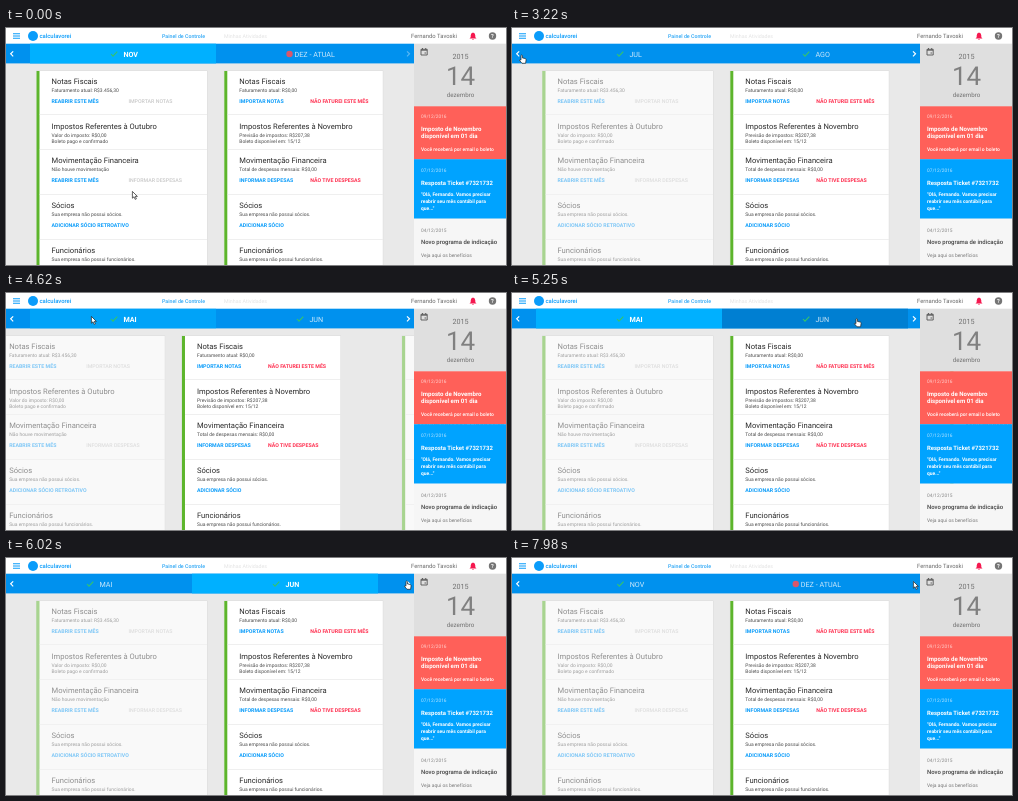
An HTML page that plays this animation: 500x237 px, repeating every 8000 ms.

```html
<!DOCTYPE html>
<html lang="pt-BR">
<head>
<meta charset="utf-8">
<style>
  html, body { margin: 0; width: 100%; height: 100%; overflow: hidden; background: #e9e9e9; }
  svg { display: block; width: 100%; height: 100%; }
  text { font-family: Roboto, sans-serif; text-rendering: geometricPrecision; white-space: pre; }
</style>
</head>
<body>
<svg id="stage" viewBox="0 0 500 237"></svg>
<script>
const LOOP = 8000, STEP = 70, PAGE = 408, TAB = 186, TAB_LEFT = 24;
const BLUE = '#0a9cfa', RED = '#ff3050', OFF = '#c8c8c8', BAR = '#0091ee';
const MONTHS = ['MAI', 'JUN', 'JUL', 'AGO', 'SET', 'OUT', 'NOV', 'DEZ - ATUAL'];

const text = (x, y, size, fill, str, extra = '') =>
  `<text x="${x}" y="${y}" font-size="${size}" fill="${fill}" ${extra}>${str}</text>`;
const rect = (x, y, w, h, fill, extra = '') =>
  `<rect x="${x}" y="${y}" width="${w}" height="${h}" fill="${fill}" ${extra}/>`;
const line = (d, stroke, width = 1) =>
  `<path d="${d}" fill="none" stroke="${stroke}" stroke-width="${width}"/>`;
const medium = 'font-weight="500"', bold = 'font-weight="700"', centred = 'text-anchor="middle"';

// One card: rows of [title baseline, title, details, first action, second action].
function card(x, width, rows, secondX, secondFill, overlay = '') {
  const body = rows.map(([y, title, details, first = '', second = '']) => {
    const actionY = y + 19.2;
    return text(15, y, 7.6, '#2b2b2b', title)
      + details.map((d, i) => text(15, y + 7.7 + i * 5.8, 4.95, '#4a4a4a', d)).join('')
      + text(15, actionY, 5.25, BLUE, first, bold)
      + text(secondX, actionY, 5.25, secondFill, second, secondFill === OFF ? medium : bold);
  }).join('');
  const rules = [86, 121, 166, 211].map(y => rect(3, y, width - 3, .6, '#e4e4e4')).join('');
  return `<g transform="translate(${x})">`
    + rect(-.4, 42.6, width + .8, 200, '#d6d6d6') + rect(0, 43, width, 200, '#fff')
    + rect(0, 43, 3, 200, '#5db52c') + rules + body + overlay + '</g>';
}

const noPartners = 'Sua empresa não possui sócios.', noStaff = 'Sua empresa não possui funcionários.';
const veil = rect(0, 43, 170.5, 200, '#f4f4f4', 'class="veil"');
const page = card(30.5, 170.5, [
  [56, 'Notas Fiscais', ['Faturamento atual: R$3.456,30'], 'REABRIR ESTE MÊS', 'IMPORTAR NOTAS'],
  [101.3, 'Impostos Referentes à Outubro', ['Valor do imposto: R$0,00', 'Boleto pago e confirmado']],
  [135.1, 'Movimentação Financeira', ['Não houve movimentação'], 'REABRIR ESTE MÊS', 'INFORMAR DESPESAS'],
  [180, 'Sócios', [noPartners], 'ADICIONAR SÓCIO RETROATIVO'],
  [225, 'Funcionários', [noStaff]],
], 92, OFF, veil) + card(218.3, 158.5, [
  [56, 'Notas Fiscais', ['Faturamento atual: R$0,00'], 'IMPORTAR NOTAS', 'NÃO FATUREI ESTE MÊS'],
  [101.3, 'Impostos Referentes à Novembro', ['Previsão de impostos: R$207,38', 'Boleto disponível em: 15/12']],
  [135.1, 'Movimentação Financeira', ['Total de despesas mensais: R$0,00'], 'INFORMAR DESPESAS', 'NÃO TIVE DESPESAS'],
  [180, 'Sócios', [noPartners], 'ADICIONAR SÓCIO'],
  [225, 'Funcionários', [noStaff]],
], 86, RED);

const tabs = MONTHS.map((month, i) => {
  const current = i === MONTHS.length - 1;
  const icon = current ? '<circle cx="73.5" cy="26" r="3.2" fill="#d9576b"/>'
    : line('M81 26l2 2.2 4.300-4.600', '#35c46a', 1.1);
  return `<g class="tab" transform="translate(${(i - 6) * TAB + TAB_LEFT})">`
    + rect(0, 15.7, TAB, 19.7, '#00b0ff') + icon
    + text(current ? 78.5 : 93.4, 28.6, 7.2, '#fff', month) + '</g>';
}).join('');

const header = line('M7 5.700h7M7 8h7M7 10.300h7', BLUE, 1.1)
  + `<circle cx="27" cy="8" r="5" fill="${BLUE}"/>`
  + text(33.5, 10.1, 5.9, BLUE, 'calculavorei', medium)
  + text(156, 9.8, 5.25, '#2ba6f5', 'Painel de Controle', medium)
  + text(218, 9.8, 5.25, '#e2e2e2', 'Minhas Atividades')
  + text(405, 10.2, 5.9, '#6a6a6a', 'Fernando Tavoski')
  + '<path d="M463.500 10.500l1.200-1.300V7.400q0-2.600 2.300-3 2.300.400 2.300 3v1.800l1.200 1.300zM465.900 11.100h2.200q-1.100 1.500-2.200 0" fill="#f5184f"/>'
  + '<circle cx="486.5" cy="8" r="3.700" fill="#757575"/>'
  + text(486.5, 10, 5.6, '#fff', '?', centred + ' ' + bold);

const faint = 'fill-opacity=".7"';
const sidebar = rect(408, 15.7, 92, 62.8, '#dfdfdf')
  + line('M415 21.300h6.200v5.700h-6.200zM415 22.200h6.200M416.500 20v1.500M419.700 20v1.500M418.500 25h1.600', '#555', .9)
  + text(454.5, 30.5, 7.2, '#707070', '2015', centred)
  + text(454.5, 56.5, 26, '#808080', '14', centred)
  + text(454.5, 69.3, 6.2, '#707070', 'dezembro', centred)
  + rect(408, 78.3, 92, 52.9, '#ff6059')
  + text(415, 89.5, 4.8, '#fff', '09/12/2016', faint)
  + text(415, 103.2, 6.1, '#fff', 'Imposto de Novembro', bold)
  + text(415, 110.3, 6.1, '#fff', 'disponível em 01 dia', bold)
  + text(415, 122.8, 4.95, '#fff', 'Você receberá por email o boleto', medium)
  + rect(408, 131.2, 92, 59.5, '#00a3ff')
  + text(415, 143.5, 4.8, '#fff', '07/12/2016', faint)
  + text(415, 157.2, 5.95, '#fff', 'Resposta Ticket #7321732', bold)
  + ['"Olá, Fernando. Vamos precisar', 'reabrir seu mês contábil para', 'que..."']
    .map((s, i) => text(415, 168.4 + i * 6.8, 4.95, '#fff', s, bold)).join('')
  + rect(408, 190.7, 92, 47, '#f6f6f6')
  + text(415, 203.7, 4.8, '#888', '04/12/2015')
  + text(415, 216.4, 5.95, '#444', 'Novo programa de indicação', medium)
  + text(415, 228.6, 4.95, '#777', 'Veja aqui os benefícios');

const stage = document.getElementById('stage');
stage.innerHTML = '<defs><clipPath id="strip"><rect x="12" y="15" width="385" height="21"/></clipPath></defs>'
  + rect(0, 0, 500, 237, '#e9e9e9') + rect(0, 0, 500, 16, '#fff')
  + `<g id="pages"><g transform="translate(${-PAGE})">${page}</g>${page}</g>`
  + rect(0, 15.7, 408, 19.7, BAR)
  + `<g clip-path="url(#strip)"><g id="tabs">${tabs}</g></g>`
  + line('M7.200 23.300L4.700 25.800l2.500 2.500', '#fff', 1.2)
  + '<g id="next">' + line('M401 23.300l2.500 2.500-2.500 2.500', '#fff', 1.2) + '</g>'
  + header + sidebar
  + '<g id="cursor" stroke="#222" stroke-width=".7" fill="#fff" stroke-linejoin="round">'
  + '<path id="arrow" d="M.4.4v6.800l1.600-1.400 1.200 2.600 1.200-.6-1.200-2.400h2.200z"/>'
  + '<path id="hand" d="M2 5V1q.7-1 1.400 0v2.400l3 .7q.8.300.7 1.200l-.5 3.500H3L.4 5.700q.5-1 1.600-.1z"/></g>';

const get = id => document.getElementById(id);
const tabNodes = [...stage.querySelectorAll('.tab')];
const veils = stage.querySelectorAll('.veil');
const clamp = v => Math.min(1, Math.max(0, v));

// cubic-bezier(.35, 0, .25, 1), solved for x by bisection.
function ease(x) {
  if (x <= 0 || x >= 1) return clamp(x);
  let lo = 0, hi = 1, s;
  for (let i = 0; i < 20; i++) {
    s = (lo + hi) / 2;
    const at = 3 * (1 - s) ** 2 * s * .35 + 3 * (1 - s) * s * s * .25 + s ** 3;
    at < x ? lo = s : hi = s;
  }
  return s * s * (3 - 2 * s);
}

// Moves are [start, destination, duration].
const follow = (moves, t) => moves.reduce(
  (value, [start, to, duration = 500]) => value + (to - value) * ease((t - start) / duration), 0);

const SCROLL = [[1915, 372], [2545, 744], [3385, 1116], [5378, 1092],
  [6250, 744], [6876, 372], [7565, 0, 430]];
const SLIDE = [[4299, PAGE], [5378, 0]];
const PATH = [[0, 126, 163], [210, 184, 168], [560, 44, 184], [840, 94, 199], [1070, 94, 199],
  [1470, 32, 3], [1750, 7, 26.5], [3850, 7, 26.5], [4200, 85, 23], [4760, 85, 23],
  [5180, 342, 25], [5320, 342, 25], [5600, 377, 23], [5670, 377, 23], [5880, 394, 22],
  [6020, 398, 22.5], [7840, 398, 22.5], [7980, 401, 23]];
// Selected tabs as [time, month index].
const SELECTED = [[-LOOP, 6], [4350, 0], [5400, 1]];

function pointer(t) {
  const i = Math.max(1, PATH.findIndex(p => p[0] >= t));
  const [t0, x0, y0] = PATH[i - 1], [t1, x1, y1] = PATH[i];
  const p = clamp((t - t0) / (t1 - t0)), k = p * p * (3 - 2 * p);
  return [x0 + (x1 - x0) * k, y0 + (y1 - y0) * k];
}

function draw(now) {
  const t = Math.floor(now % LOOP / STEP) * STEP;
  const scroll = follow(SCROLL, t);
  get('tabs').setAttribute('transform', `translate(${scroll})`);
  get('pages').setAttribute('transform', `translate(${follow(SLIDE, t)})`);
  get('next').setAttribute('opacity', scroll < 1 ? .35 : 1);

  const fade = .5 * clamp((t - 1330) / 350);
  veils.forEach(node => node.setAttribute('opacity', fade));

  const [since, active] = SELECTED.filter(([start]) => start <= t).pop();
  const [x, y] = pointer(t);
  const overStrip = y > 16 && y < 35 && x > 14 && x < 391;
  const hovered = overStrip ? Math.floor((x - scroll - TAB_LEFT) / TAB) + 6 : -1;
  tabNodes.forEach((node, i) => {
    const isActive = i === active;
    const back = node.querySelector('rect'), label = node.querySelector('text');
    back.setAttribute('fill', isActive ? '#00b0ff' : '#007fd2');
    back.setAttribute('opacity', isActive ? clamp((t - since) / 450) : +(i === hovered));
    label.setAttribute('font-weight', isActive ? 700 : 400);
    label.setAttribute('fill-opacity', isActive ? 1 : .8);
  });

  const hand = t >= 1700 && t < 3900 || t >= 4900 && t < 7900;
  get('hand').setAttribute('visibility', hand ? 'visible' : 'hidden');
  get('arrow').setAttribute('visibility', hand ? 'hidden' : 'visible');
  get('cursor').setAttribute('transform', `translate(${x} ${y})`);
}

const began = performance.now();
function tick() {
  draw(performance.now() - began);
  requestAnimationFrame(tick);
}
tick();
</script>
</body>
</html>
```
